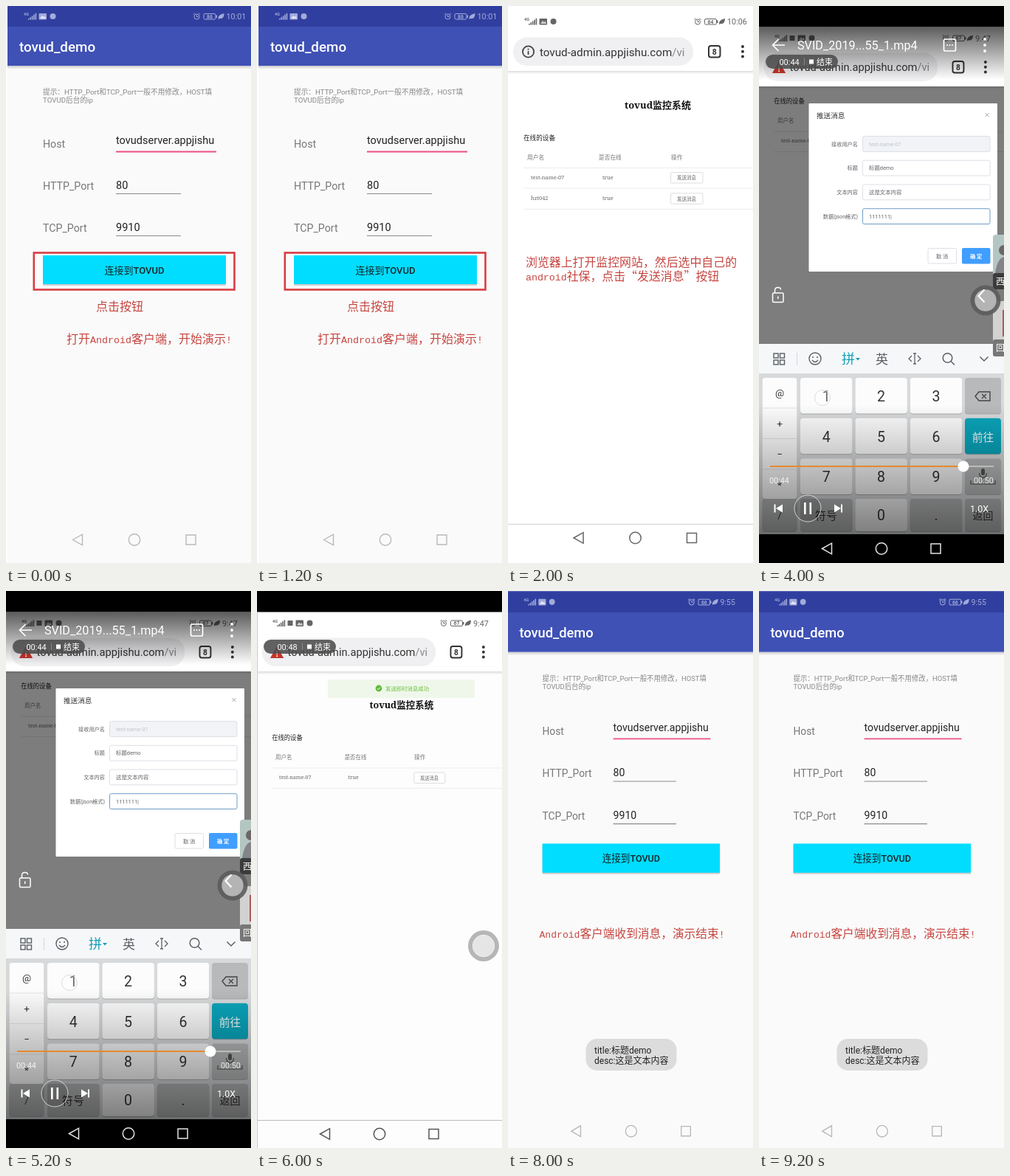
Recreate the animation shown at these times as an HTML page. Size 332x755 px, loop 10 s.

```html
<!DOCTYPE html>
<html lang="zh-CN">
<head>
<meta charset="utf-8">
<title>Push demo</title>
<style>
  html, body { margin: 0; width: 100%; height: 100%; overflow: hidden; background: #fff; }
  svg { display: block; font-family: Roboto, "Noto Sans CJK SC", "Noto Sans CJK", sans-serif; }
  .serif { font-family: "Noto Serif", "Noto Sans CJK SC", "Noto Sans CJK", serif; }
  .note { font-family: "Noto Sans CJK SC", "Noto Sans CJK", sans-serif; font-weight: 300; }
  .note tspan { font-family: "Liberation Mono", monospace; }
</style>
</head>
<body>
<svg id="stage" width="332" height="755" viewBox="0 0 332 755"></svg>
<script>
const HOLD = 2000;
const APP = 'tovud', USER = 'test-name-07';

const rect = (x, y, w, h, fill, more = '') =>
  `<rect x="${x}" y="${y}" width="${w}" height="${h}" fill="${fill}" ${more}/>`;
const circle = (x, y, r, fill, more = '') =>
  `<circle cx="${x}" cy="${y}" r="${r}" fill="${fill}" ${more}/>`;
const line = (d, color, width = 1, more = '') =>
  `<path d="${d}" fill="none" stroke="${color}" stroke-width="${width}" ${more}/>`;
const shape = (d, fill, more = '') => `<path d="${d}" fill="${fill}" ${more}/>`;
const text = (x, y, size, str, fill = '#222', more = '') =>
  `<text x="${x}" y="${y}" font-size="${size}" fill="${fill}" ${more}>${str}</text>`;
const mid = (x, y, size, str, fill, more = '') =>
  text(x, y, size, str, fill, `text-anchor="middle" ${more}`);
const group = (transform, body) => `<g transform="${transform}">${body}</g>`;
const fade = (id, y1, a1, y2, a2) =>
  `<linearGradient id="${id}" x2="0" y2="1"><stop stop-opacity="${a1}"/><stop offset="1" stop-opacity="${a2}"/></linearGradient>` +
  rect(0, y1, 332, y2 - y1, `url(#${id})`);

// Red caption; Latin letters take half a Chinese character each.
const note = (x, y, size, str) => text(x, y, size,
  str.replace(/[A-Za-z!]+/g, s => `<tspan font-size="${size / 1.2}">${s}</tspan>`),
  '#c64540', 'class="note"');

function status(y, x, a, charge, time, color, recording) {
  let s = text(x - 1, y - 1, 5.5, '4G', color, 'font-weight="700"');
  for (let i = 0; i < 5; i++) s += rect(x + 5 + i * 2.4, y + 3 - i * 1.8, 1.6, 1.6 + i * 1.8, color);
  let p = x + 19.5;
  if (recording) { s += rect(p, y - 3.5, 7, 7, color); p += 11; }
  s += rect(p, y - 4, 10.5, 8.5, color, 'rx="1"') +
    shape(`M${p + 1.5} ${y + 3}l3-4 2 2 1.5-1.5 1.5 3.5z`, '#fff', 'opacity=".7"') +
    circle(p + 19, y, 4, color);
  s += circle(a, y + .5, 3.5, 'none', `stroke="${color}"`) +
    line(`M${a} ${y - 1.5}v2h2M${a - 4.5} ${y - 2.5}l2-2M${a + 4.5} ${y - 2.5}l-2-2`, color);
  s += rect(a + 9.5, y - 3.5, 16, 7.5, 'none', `stroke="${color}" rx="1.5"`) +
    rect(a + 26, y - 1.5, 1.5, 3.5, color) +
    mid(a + 17.5, y + 2.8, 6.8, charge, color, 'font-weight="700"');
  s += shape(`M${a + 29} ${y + 4}q-1-6 8-8q0 8-6 7z`, color);
  return s + text(a + 40, y + 4, 10.8, time, color);
}

const nav = (x, y, color, gap = 76.5, width = 1.5) =>
  line(`M${x - gap - 7} ${y}l13-7.3v14.6zM${x + gap - 6.5} ${y - 6.5}h13v13h-13z`, color, width) +
  circle(x, y, 7.7, 'none', `stroke="${color}" stroke-width="${width}"`);

function field(y, label, value, right, color, width) {
  return text(50, y + 5, 14.2, label, '#777') +
    text(149, y + (right > 250 ? 0 : 4), 14.5, value, '#222') +
    line(`M149 ${y + 10.5}H${right}`, color, width);
}

function form(time, charge, noteBox = '') {
  const up = APP.toUpperCase();
  return rect(2, 0, 400, 770, '#fafafa') +
    rect(2, 81, 400, 2, '#000', 'opacity=".16"') + rect(2, 83, 400, 2, '#000', 'opacity=".06"') +
    rect(2, 0, 400, 28, '#303f9f') + rect(2, 28, 400, 53, '#3f51b5') +
    status(14, 25, 258.5, charge, time, '#a3abd9') +
    text(18, 62, 18.8, APP + '_demo', '#fff', 'font-weight="500"') +
    text(50, 120, 9.7, '提示：HTTP_Port和TCP_Port一般不用修改，HOST填', '#888') +
    text(50, 131, 9.7, up + '后台的ip', '#888') +
    field(187, 'Host', APP + 'server.appjishu', 285, '#ee4f86', 1.8) +
    field(244, 'HTTP_Port', '80', 237, '#8b8b8b', 1) +
    field(301, 'TCP_Port', '9910', 237, '#8b8b8b', 1) +
    rect(50, 340, 248, 39, '#000', 'opacity=".18" rx="1"') + rect(50, 338, 248, 39, '#00ddff') +
    mid(174, 362.5, 13, '连接到' + up, '#182428', 'font-weight="500"') +
    noteBox + nav(174, 723.5, '#b9b9b9', 76.5, 1.4);
}

function table(users) {
  let s = mid(203, 138.5, 13, APP + '监控系统', '#111', 'class="serif" font-weight="700"') +
    text(21, 182, 8.6, '在线的设备', '#222');
  [[26, '用户名'], [123, '是否在线'], [221, '操作']].forEach(([x, t]) => s += text(x, 208, 7.7, t, '#777'));
  s += line('M21 219.5H350', '#ececec');
  users.forEach((name, i) => {
    const y = 232 + i * 28.3;
    s += text(31, y + 2.7, 7.4, name, '#666', 'class="serif"') +
      text(128, y + 2.7, 7.4, 'true', '#666', 'class="serif"') +
      rect(220.5, y - 6.5, 43.5, 14.5, '#fff', 'stroke="#ddd" rx="1.5"') +
      mid(242, y + 3.3, 6.5, '发送消息', '#666') +
      line(`M21 ${y + 15}H350`, '#ececec');
  });
  return s;
}

function urlBar(warn) {
  const icon = warn
    ? shape('M28 54l9.5 16h-19z', '#c5352b') + rect(27.2, 60, 1.8, 5, '#fff') + rect(27.2, 66.3, 1.8, 1.8, '#fff')
    : circle(27.5, 62, 7.6, 'none', 'stroke="#444" stroke-width="1.8"') + rect(26.6, 61, 1.8, 5, '#444') + rect(26.6, 57.7, 1.8, 1.8, '#444');
  return rect(0, 88, 350, 1.5, '#000', 'opacity=".12"') + rect(0, 89.5, 350, 2, '#000', 'opacity=".05"') +
    rect(0, 7, 350, 81, '#fff') + rect(7, 42.5, 244, 38.5, '#f0f0f3', 'rx="19.2"') + icon +
    text(43, 67.5, 15.2, APP + '-admin.appjishu.com<tspan fill="#888">/vi</tspan>', '#333') +
    rect(272, 54, 15.5, 15.5, 'none', 'stroke="#333" stroke-width="2" rx="3"') +
    mid(279.7, 65.7, 10.5, '8', '#333', 'font-weight="700"') +
    [55, 61.7, 68.4].map(y => circle(318, y, 2, '#333')).join('');
}

const shift = y => `translate(0 ${y}) scale(.965 1)`;

const recorder = time =>
  rect(9, 66, 98, 19, '#4c4c4c', 'rx="9.5" opacity=".87"') +
  text(27.5, 79.5, 10.9, time, '#fff') + line('M61.5 70.5v10', '#888') +
  rect(68, 72.5, 6, 6, '#fff') + text(78, 79.5, 10.9, '结束', '#fff');

function dialog() {
  let s = rect(67.5, 132, 255.5, 228, '#fff', 'rx="1"') +
    text(78, 151.5, 9.6, '推送消息', '#333') + line('M306.5 145l5 5m0-5l-5 5', '#999', .9);
  [['接收用户名', USER], ['标题', '标题demo'], ['文本内容', '这是文本内容'], ['数据(json格式)', '1111111|']]
    .forEach(([label, value], i) => {
      const y = 187 + i * 32.7;
      s += text(134, y + 2.7, 7.2, label, '#606266', 'text-anchor="end"') +
        rect(140.5, y - 10.4, 172.5, 20.8, i ? '#fff' : '#f1f3f6', `rx="2" stroke="${i > 2 ? '#6f9cc4' : '#dcdfe6'}"`) +
        text(149, y + 2.7, 7.4, value, i ? '#606266' : '#c0c4cc');
    });
  return s + rect(229, 328.5, 38.5, 20.5, '#fff', 'rx="2" stroke="#dcdfe6"') + mid(248.2, 341.5, 7.3, '取 消', '#606266') +
    rect(275, 328, 38.5, 21.5, '#409eff', 'rx="2"') + mid(294.2, 341.5, 7.3, '确 定', '#fff', 'font-weight="700"');
}

function keyboard() {
  const ink = '#5b6066', teal = '#13a0b4', dim = '#b8b9ba';
  const key = (x, y, w, h, fill) =>
    rect(x, y + 1, w, h, '#a9abad', 'rx="4"') + rect(x, y, w, h, fill, 'rx="4"');
  let s = rect(0, 458, 332, 258, '#d7d9db') + rect(0, 458, 332, 40, '#f6f7f9');
  for (const x of [20, 28.5]) for (const y of [471, 480]) s += rect(x, y, 6, 6, 'none', `stroke="${ink}" stroke-width="1.4"`);
  s += line('M51.5 470v17', '#d5d5d5') +
    circle(76, 478, 8, 'none', `stroke="${ink}" stroke-width="1.4"`) + circle(73, 476, 1, ink) + circle(79, 476, 1, ink) +
    line('M72 480q4 5 8 0', ink, 1.3) +
    text(112, 484.5, 18, '拼', teal) + shape('M131 477h6l-3 3.5z', teal) + text(158, 484.5, 17, '英', ink) +
    line('M211 471v14m-2-14h4m-4 14h4M207 474l-4 4 4 4M215 474l4 4-4 4', ink, 1.3) +
    circle(255.5, 477, 6.3, 'none', `stroke="${ink}" stroke-width="1.5"`) + line('M260 481.5l5 5', ink, 1.5) +
    line('M299.5 475.5l5.5 5.5 5.5-5.5', ink, 1.5);
  s += key(4.5, 504, 47, 164, '#fcfcfc') + key(4.5, 668, 47, 44, dim);
  ['@', '+', '−', '*', '/'].forEach((c, i) => {
    const y = 524 + i * 41.5;
    s += mid(28, y + 5, 13.5, c, '#333');
    if (i < 3) s += line(`M5 ${y + 21}h46`, '#e3e3e3');
  });
  ['123', '456', '789', ' 0.'].forEach((row, r) => [...row].forEach((c, i) => {
    const x = 56 + i * 74.4, y = 504 + r * 54.7;
    s += key(x, y, 70.5, r > 2 ? 44 : 48.5, r > 2 && i != 1 ? dim : '#fcfcfc') +
      mid(x + 35.2, y + (r > 2 ? 28.5 : 32), 19.5, c, '#333');
  }));
  s += mid(91, 695.5, 15, '符号', '#333');
  [504, 558.7, 613.4, 668].forEach((y, i) => s += key(279, y, 49, i > 2 ? 44 : 48.5, i == 1 ? '#0aa5bb' : dim));
  s += line('M293 529l5-6h15v12h-15zM302 526l6 6m0-6l-6 6', '#444', 1.4) +
    mid(303.5, 589.5, 14.7, '前往', '#fff') + mid(303.5, 695.5, 14, '返回', '#333') +
    rect(301, 627, 5, 9, '#555', 'rx="2.5"') + line('M298.5 633q0 6 5 6t5-6M303.5 639v3M287 643v5h33v-5', '#555', 1.2);
  return s + circle(86, 531, 10.5, '#fff', 'fill-opacity=".25" stroke="#ddd"');
}

function player() {
  const w = '#fff';
  let s = line('M35 53H18.5m8-8l-8 8 8 8', w, 1.7) + text(52, 59, 16.2, 'SVID_2019...55_1.mp4', w) +
    rect(250.5, 45, 16, 16, 'none', 'stroke="#fff" stroke-width="1.7" rx="2"') +
    line('M254 53h9', w, 1.5, 'stroke-dasharray="2 1.5"') +
    [45, 53, 61].map(y => circle(306, y, 1.9, w)).join('');
  // Side thumbnails
  s += rect(317, 310, 20, 74, '#b4c6c2', 'rx="4"') + circle(332, 331, 7, '#6c6666') +
    shape('M319 372q2-30 13-32v32z', '#85838a') + rect(317, 362, 20, 22, '#3c3c3c', 'rx="3"') + text(321, 377.5, 12, '西', w) +
    rect(317, 400, 20, 75, '#d2d2d2', 'rx="4"') + rect(330, 412, 2, 36, '#b05a5a') +
    rect(317, 452, 20, 23, '#777', 'rx="3"') + text(321, 468, 12, '回', w);
  // Floating button and lock
  s += circle(307, 399, 20.5, '#5c5c5c', 'opacity=".9"') + circle(307, 399, 14.7, '#b4b4b4') +
    line('M305.5 384.5l-8 8.5 8 8.5', w, 2.2) +
    rect(18.5, 389, 14.5, 12.5, 'none', 'stroke="#fff" stroke-width="1.5" rx="1.5"') +
    line('M21.5 389v-3.5q0-4 4-4t4 3M25.7 393.5v3.5', w, 1.5);
  // Progress and controls
  return s + line('M15 624H318', w, 2, 'opacity=".4"') + line('M15 624H277', '#e8892b', 2.2) + circle(277, 624, 7.5, w) +
    text(14, 647, 10.8, '00:44', w, 'opacity=".85"') + text(291, 647, 10.8, '00:50', w, 'opacity=".85"') +
    shape('M20.5 675.5h2v11h-2zM32 675.5v11l-9-5.5zM102 675.5v11l9-5.5zM111 675.5h2v11h-2z', w) +
    circle(66, 681, 18, '#000', 'fill-opacity=".12" stroke="#fff" stroke-opacity=".7"') +
    rect(61, 673, 2.6, 16, w) + rect(68.5, 673, 2.6, 16, w) + text(286, 685.5, 12.4, '1.0X', w);
}

const chrome = () => group(shift(21), urlBar(true)) + rect(0, 0, 332, 28.5, '#000') +
  status(43.5, 22, 253, '67', '9:47', '#666', true);

const scenes = [
  () => rect(0, 0, 332, 755, '#fff') + form('10:01', '86',
    rect(37.8, 334.5, 271.7, 50, 'none', 'stroke="#d93c42" stroke-width="2.6"')) +
    note(122, 413, 16, '点击按钮') + note(82, 457, 16, '打开Android客户端，开始演示!'),

  () => rect(0, 0, 332, 755, '#fff') + urlBar(false) + status(21, 23, 257, '64', '10:06', '#666') +
    table([USER, 'hzt042']) +
    note(24, 352.5, 15.9, '浏览器上打开监控网站，然后选中自己的') +
    note(24, 372, 15.9, 'android社保，点击“发送消息”按钮') +
    line('M0 702.5H332', '#d0d0d0') + nav(172.5, 721, '#666'),

  () => rect(0, 0, 332, 755, '#fff') + group(shift(-49.5), table([USER])) +
    rect(0, 109, 332, 350, '#000', 'opacity=".51"') + chrome() +
    fade('top', 28.5, .64, 100, 0) + dialog() + keyboard() + fade('bottom', 540, 0, 716, .5) +
    recorder('00:44') + player() + rect(0, 716, 332, 39, '#000') + nav(166, 735.5, '#e4e4e4', 73.5),

  () => rect(0, 0, 332, 755, '#fdfdfd') + group(shift(20.5), table([USER])) + chrome() + recorder('00:48') +
    rect(96, 120, 199, 25, '#eff7ea', 'rx="1.5"') + circle(165, 132, 4.4, '#5fbb3a') +
    line('M163 132l1.5 1.6 2.7-3', '#fff', 1) + text(174, 135, 7.4, '发送即时消息成功', '#67c23a') +
    circle(307, 481, 21, '#b6b6b6') + circle(307, 481, 14.7, '#e5e5e5', 'stroke="#f2f2f2"') +
    line('M0 717.5H332', '#bbb') + line('M.5 28.5V755', '#ccc') + nav(166, 736, '#555', 73.5),

  () => group('translate(-1.94 .7) scale(.97 1.011)', rect(0, -2, 350, 10, '#303f9f') + form('9:55', '66')) +
    note(42.5, 470, 15.7, 'Android客户端收到消息，演示结束!') +
    rect(105.5, 607, 123, 43, '#dcdcdc', 'rx="15"') +
    text(117, 626.5, 12, 'title:标题demo', '#222') + text(117, 641, 12, 'desc:这是文本内容', '#222')
];

const stage = document.getElementById('stage');
stage.innerHTML = scenes.map(draw => `<g>${draw()}</g>`).join('');
const layers = [...stage.children];

function tick() {
  const now = Math.floor(performance.now() / HOLD) % layers.length;
  layers.forEach((g, i) => g.style.display = i === now ? '' : 'none');
  requestAnimationFrame(tick);
}
tick();
</script>
</body>
</html>
```
